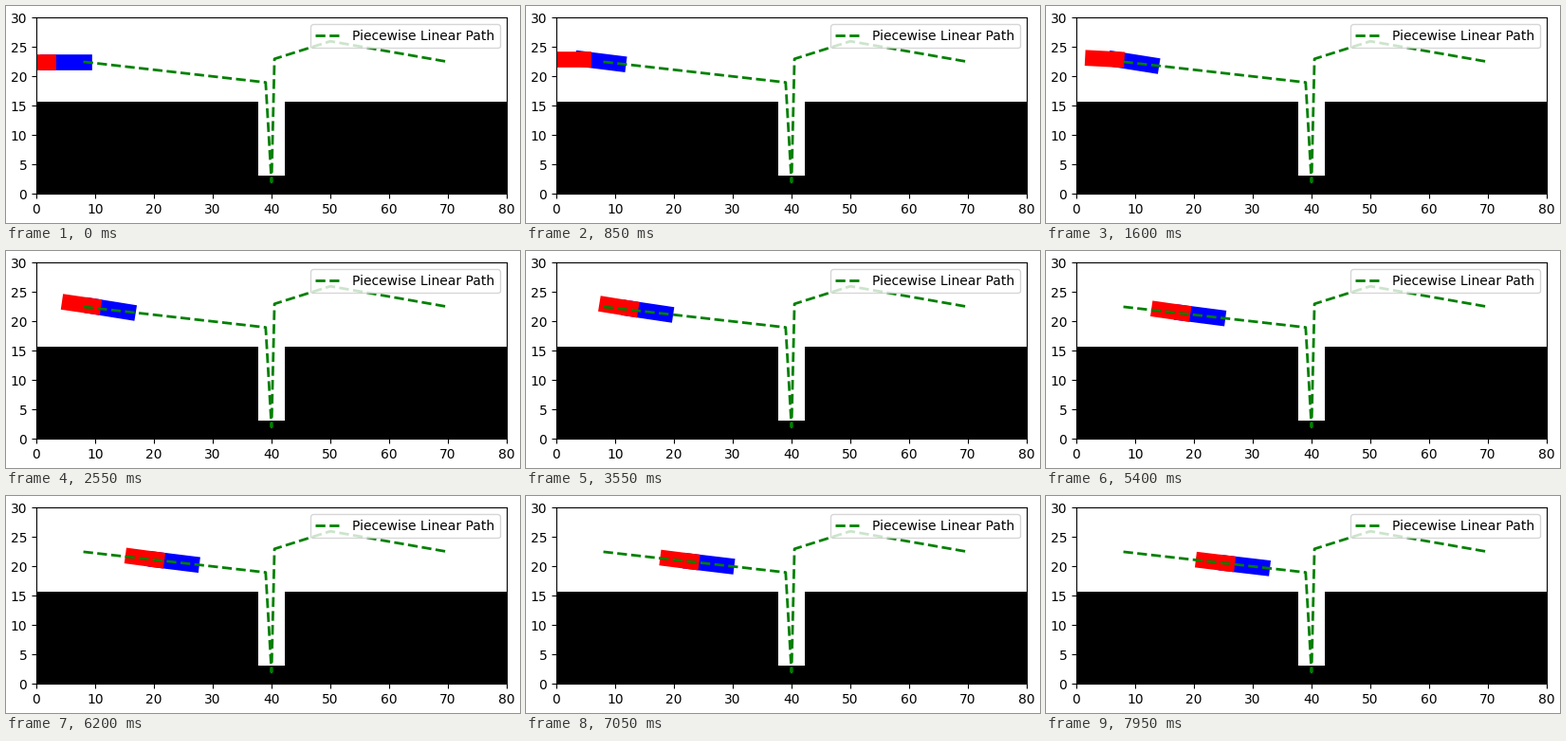
A matplotlib script for the animation above (8000 ms loop, 542 px wide and 229 px high).

```python
import numpy as np
import matplotlib.pyplot as plt
from matplotlib.animation import FuncAnimation
from matplotlib.patches import Rectangle

W, H, DPI = 542, 229, 100
FRAMES, INTERVAL = 160, 50
FRONT, REAR = 6.0, 4.0      # link lengths
STEP = 0.1483               # head advance in x per frame
SETTLE, SWING = 28, 0.45    # frames to settle, overshoot rate in degrees

PATH = np.array([(8, 22.5), (39, 19), (40, 2), (40.5, 23), (50, 26), (70, 22.5)])
RUN, DROP = PATH[1] - PATH[0]
SLOPE = np.degrees(np.arctan2(-DROP, RUN))

GROUND, FLOOR = 15.65, 3.05
PIT_LEFT, PIT_RIGHT = 37.75, 42.25

fig = plt.figure(figsize=(W / DPI, H / DPI), dpi=DPI)
ax = fig.add_axes([32 / W, 30.6 / H, 496 / W, 186 / H])
ax.set_xlim(0, 80)
ax.set_ylim(0, 30)
ax.set_xticks(range(0, 81, 10))
ax.set_yticks(range(0, 31, 5))


def block(left, right, top):
    ax.add_patch(Rectangle((left, 0), right - left, top, color="black", lw=0))


block(0, PIT_LEFT, GROUND)
block(PIT_RIGHT, 80, GROUND)
block(0, 80, FLOOR)

front, = ax.plot([], [], color="blue", lw=12)
rear, = ax.plot([], [], color="red", lw=12)
ax.plot(*PATH.T, "--", color="green", lw=2, label="Piecewise Linear Path")
ax.legend(loc="upper right")


def tilt(t):
    """Tilt in degrees: level at t = 0, overshoots, settles on the slope."""
    t = max(t, 0)
    return SLOPE + np.exp(-t / SETTLE) * (SWING * t - SLOPE)


def behind(point, length, angle):
    """Far end of a link trailing from point."""
    a = np.radians(angle)
    return point + length * np.array([-np.cos(a), np.sin(a)])


def update(frame):
    x = PATH[0, 0] + STEP * frame
    head = np.array([x, np.interp(x, *PATH.T)])
    joint = behind(head, FRONT, tilt(frame))
    # the rear link repeats the front one's swing a link length later
    tail = behind(joint, REAR, tilt(frame - REAR / STEP))
    front.set_data(*zip(joint, head))
    rear.set_data(*zip(tail, joint))
    return front, rear


anim = FuncAnimation(fig, update, frames=FRAMES, interval=INTERVAL,
                     repeat=True, repeat_delay=0)
plt.show()
```
